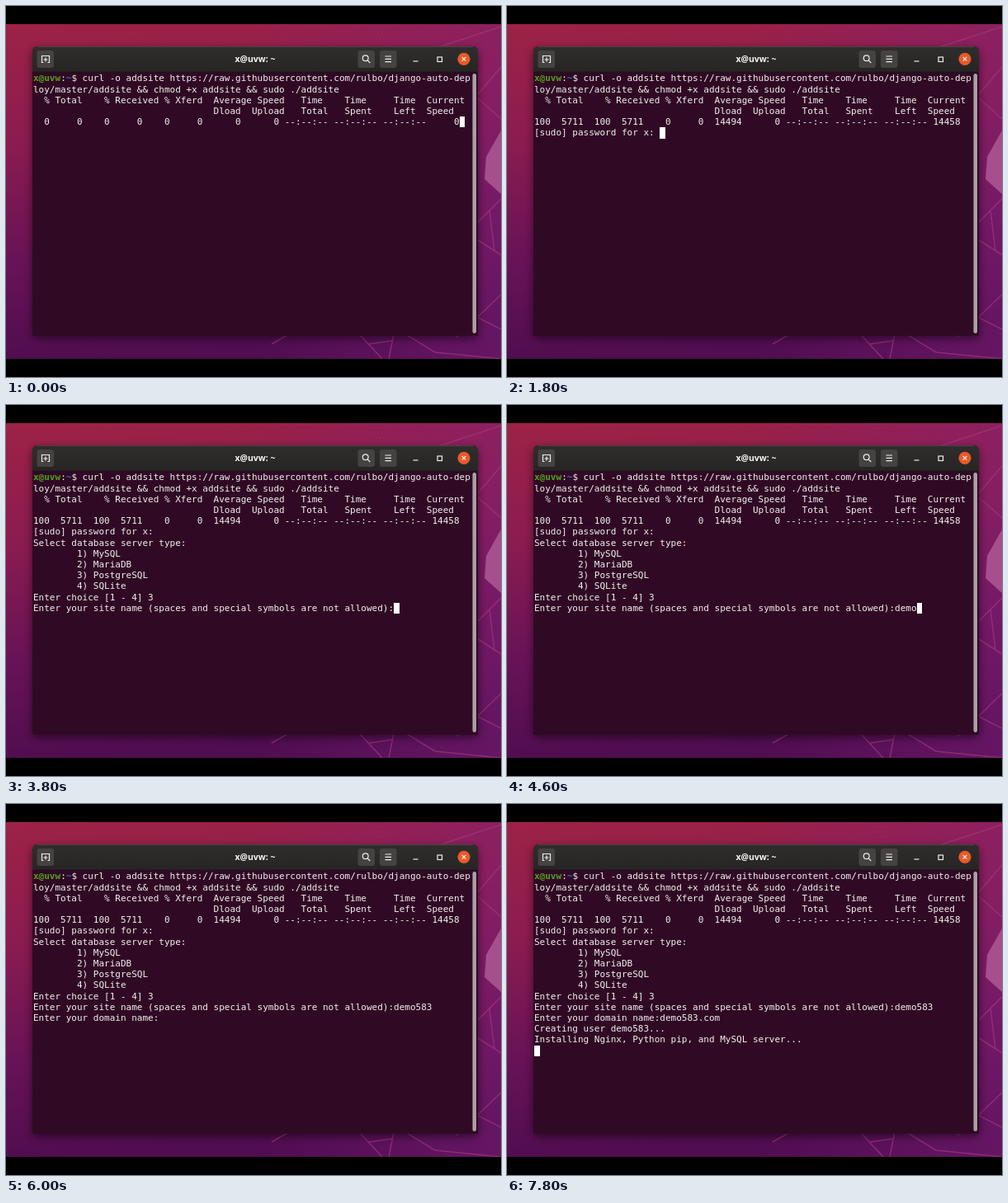
Animation of 600 by 450 pixels, one loop 8000 ms. Source, as an HTML page:

```html
<!DOCTYPE html>
<html lang="en">
<head>
<meta charset="utf-8">
<title>Terminal session</title>
<style>
  html, body { margin: 0; width: 100%; height: 100%; overflow: hidden; background: #000; }
  svg { position: absolute; left: 0; top: 0; }
  pre {
    position: absolute; left: 33px; top: 81.4px; margin: 0;
    font: 11px/13.2px "DejaVu Sans Mono", monospace; color: #f3eff1;
  }
  b { color: #55a01c; }
  b + i { color: #3c6db0; font-style: normal; font-weight: bold; }
  #cursor {
    display: inline-block; width: 6.6px; height: 13.2px;
    vertical-align: top; background: #fff;
  }
</style>
</head>
<body>
<svg width="600" height="450" viewBox="0 0 600 450">
  <defs>
    <linearGradient id="sky" x2=".12" y2="1">
      <stop offset="0" stop-color="#9d2246"/>
      <stop offset=".35" stop-color="#8b1c50"/>
      <stop offset=".7" stop-color="#681357"/>
      <stop offset="1" stop-color="#500d50"/>
    </linearGradient>
    <linearGradient id="glow">
      <stop offset=".5" stop-color="#80207a" stop-opacity="0"/>
      <stop offset="1" stop-color="#80207a" stop-opacity=".45"/>
    </linearGradient>
    <linearGradient id="bar" x2="0" y2="1">
      <stop offset="0" stop-color="#302e2d"/>
      <stop offset="1" stop-color="#272524"/>
    </linearGradient>
    <filter id="blur" x="-10%" y="-10%" width="120%" height="120%">
      <feGaussianBlur stdDeviation="5"/>
    </filter>
    <clipPath id="desk"><rect y="22" width="600" height="406"/></clipPath>
  </defs>

  <g clip-path="url(#desk)">
    <rect y="22" width="600" height="406" fill="url(#sky)"/>
    <rect y="22" width="600" height="406" fill="url(#glow)"/>
    <path d="M600 151L582 183L580 210L600 228Z" fill="#a5508c"/>
    <g fill="none" stroke="#a03a7e" stroke-opacity=".65" stroke-width="1.5">
      <path d="M524 50L600 25M572 107L600 74M572 112L600 137"/>
      <path d="M572 262L600 234M572 284L600 302M586 248L592 297"/>
      <path d="M322 410L382 376M428 398L456 428M470 398L464 428M440 410L468 406"/>
      <path d="M484 398L520 420L600 428M546 402L600 350M572 378L600 392"/>
    </g>
    <path d="M444 28H462M447 34H459M449 40H461M452 46H458" stroke="#a83a68"
      stroke-opacity=".5" stroke-dasharray="1 3"/>
    <rect x="31" y="52" width="542" height="352" rx="7" opacity=".45" filter="url(#blur)"/>
  </g>

  <path d="M32 400V56q0-7 7-7H565q7 0 7 7V400Z" fill="#300a24"/>
  <path d="M32 80V56q0-7 7-7H565q7 0 7 7V80Z" fill="url(#bar)"/>
  <path d="M38 49.5H566" stroke="#474443"/>
  <path d="M32 80H572" stroke="#1b1918"/>
  <rect x="565.5" y="82" width="4.5" height="315" rx="2.2" fill="#aaa0a5"/>

  <g fill="#454241">
    <rect x="37.5" y="54" width="20.5" height="21" rx="3"/>
    <rect x="426.5" y="54" width="20.5" height="21" rx="3"/>
    <rect x="453" y="54" width="20.5" height="21" rx="3"/>
  </g>
  <circle cx="555" cy="64.3" r="7.6" fill="#e85a29"/>
  <g fill="none" stroke="#eee" stroke-width="1.2">
    <path d="M45.5 68.5H43.5V60.5H52.5V68.5H50.5M48 62.5V67.5M45.5 65H50.5"/>
    <circle cx="435.7" cy="63.3" r="3.4"/>
    <path d="M438.2 65.8L441.3 69"/>
    <path d="M459.5 61H467M459.5 64.3H467M459.5 67.6H467"/>
    <path d="M493.5 67H499.5"/>
    <rect x="523" y="62" width="5.5" height="5.5"/>
    <path d="M552.7 62L557.3 66.6M557.3 62L552.7 66.6"/>
  </g>
  <text x="302" y="68" text-anchor="middle" fill="#f4f4f4"
    font-family="'Noto Sans', sans-serif" font-weight="700" font-size="10.5">x@uvw: ~</text>
</svg>

<pre><b>x@uvw</b>:<i>~</i>$ curl -o addsite https://raw.githubusercontent.com/rulbo/django-auto-dep
loy/master/addsite &amp;&amp; chmod +x addsite &amp;&amp; sudo ./addsite
  % Total    % Received % Xferd  Average Speed   Time    Time     Time  Current
                                 Dload  Upload   Total   Spent    Left  Speed
<span id="output"></span><span id="cursor"></span></pre>

<script>
const LOOP = 8000, BLINK = 600;
const output = document.getElementById('output');
const cursor = document.getElementById('cursor');

const typing = (start, step, text) =>
  [...text].map((char, i) => [start + i * step, char]);

// Each entry is [time, printed text]; \r overwrites the current line.
const timeline = [
  [0, '  0     0    0     0    0     0      0      0 --:--:-- --:--:-- --:--:--     0'],
  [400, '\r100  5711  100  5711    0     0  14494      0 --:--:-- --:--:-- --:--:-- 14458\n' +
    '[sudo] password for x: '],
  [2600, '\nSelect database server type:\n' +
    ['MySQL', 'MariaDB', 'PostgreSQL', 'SQLite']
      .map((name, i) => `        ${i + 1}) ${name}\n`).join('') +
    'Enter choice [1 - 4] '],
  [3400, '3'],
  [3600, '\nEnter your site name (spaces and special symbols are not allowed):'],
  ...typing(4000, 200, 'demo'),
  ...typing(4800, 100, '583'),
  [5200, '\nEnter your domain name:'],
  ...typing(6400, 130, 'demo583'),
  ...typing(7300, 100, '.com'),
  [7700, '\nCreating user demo583...\nInstalling Nginx, Python pip, and MySQL server...\n'],
];

function draw() {
  const time = performance.now() % LOOP;
  const printed = timeline.filter(([at]) => at <= time);
  const text = printed.map(([, part]) => part).join('').replace(/.*\r/g, '');
  if (output.textContent !== text) output.textContent = text;
  const idle = time - printed[printed.length - 1][0];
  cursor.style.opacity = idle % (2 * BLINK) < BLINK ? 1 : 0;
  requestAnimationFrame(draw);
}
draw();
</script>
</body>
</html>
```
